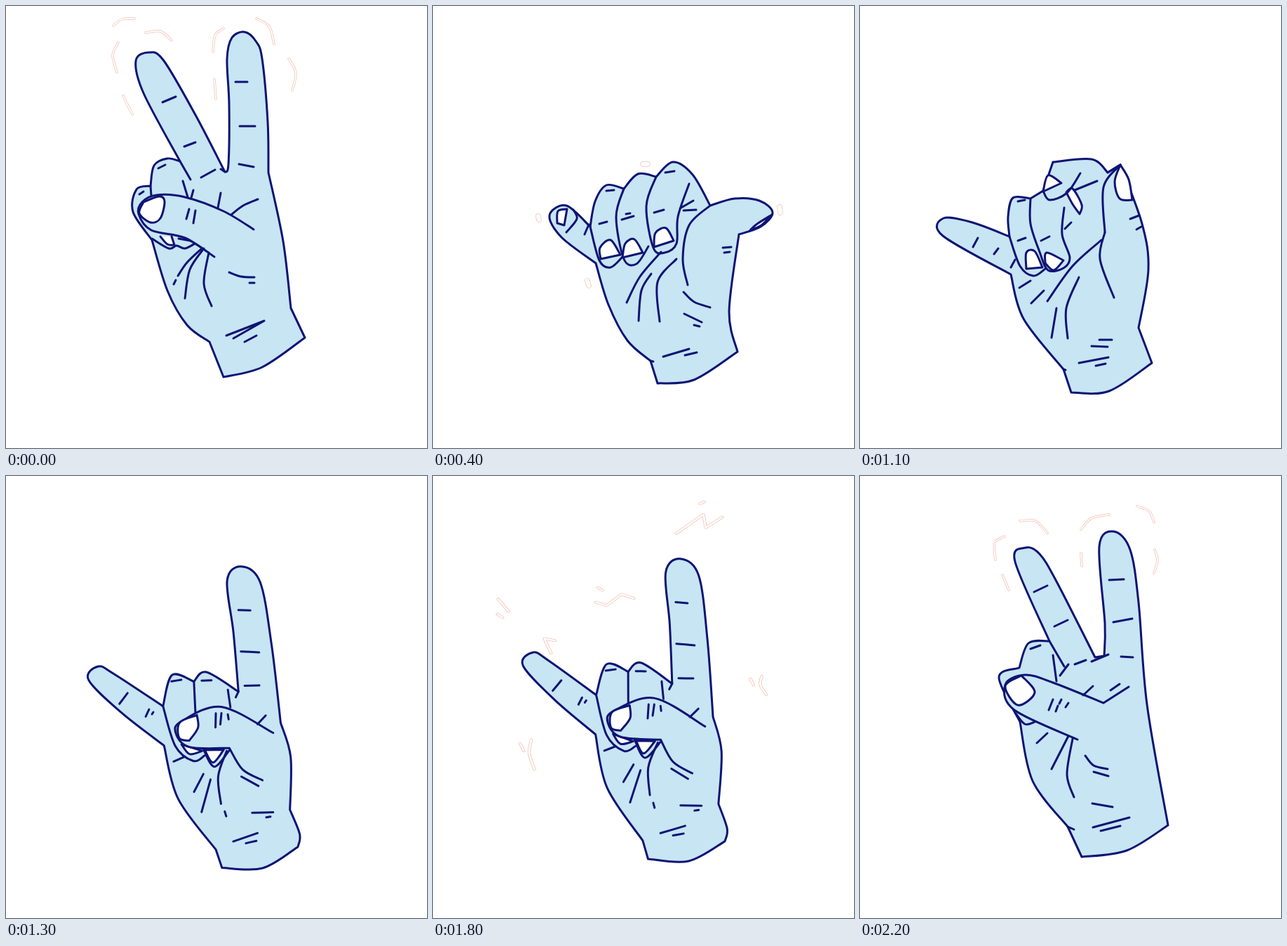
These frames come from a looping animation (600x629 px, 2300 ms). An HTML page with a canvas:

```html
<!DOCTYPE html>
<html lang="en">
<head>
<meta charset="utf-8">
<title>Hand signs</title>
<style>
html, body { margin: 0; width: 100%; height: 100%; overflow: hidden; background: #fff; }
canvas { display: block; }
</style>
</head>
<body>
<canvas id="stage" width="600" height="629"></canvas>
<script>
const ctx = document.getElementById('stage').getContext('2d');
const INK = '#0e1474', SKIN = '#c7e5f3', WHITE = '#fff', GLOW = '#f2bfb1';

// Smooth curve through points; "/" makes the last point a corner, ";" lifts the pen.
function trace(data) {
  const path = new Path2D();
  for (const line of data.split(';')) {
    let last;
    for (const part of line.split('/')) {
      const pts = part.trim().split(' ').map(p => p.split(',').map(Number));
      if (last) pts.unshift(last);
      else path.moveTo(...pts[0]);
      for (let i = 1; i < pts.length; i++) {
        const a = pts[i - 1], b = pts[i], before = pts[i - 2] || a, after = pts[i + 1] || b;
        path.bezierCurveTo(
          a[0] + (b[0] - before[0]) / 6, a[1] + (b[1] - before[1]) / 6,
          b[0] - (after[0] - a[0]) / 6, b[1] - (after[1] - a[1]) / 6, ...b);
      }
      last = pts.at(-1);
    }
  }
  return path;
}

function stroke(path, color, width) {
  ctx.strokeStyle = color;
  ctx.lineWidth = width;
  ctx.stroke(path);
}

function shape(data, fill) {
  const path = trace(data);
  if (fill) {
    ctx.fillStyle = fill;
    ctx.fill(path);
  }
  stroke(path, INK, 3);
}

const skin = data => shape(data, SKIN);
const nail = data => shape(data, WHITE);
const ink = data => shape(data);

// Hollow strokes around the hand.
function glow(data, width) {
  const path = trace(data);
  stroke(path, GLOW, width);
  stroke(path, WHITE, width - 1.5);
}

const peace = {
  marks() {
    glow('153,28 165,19 183,18;199,38 220,36 236,49;160,52 152,70 158,94;167,128 180,154', 3.4);
    glow('295,65 298,42 310,32;357,18 375,29 382,54;403,75 413,95 408,120;297,104 299,132', 3.4);
  },
  hand() {
    skin('310,528 365,514 426,472/406,430/395,335 374,237/373,165 365,75 356,50 340,37 322,45 315,75 318,140 317,225 312,236/270,155 225,78 204,66 185,78 196,124 248,221/230,217 211,227 206,256/186,261 181,293 208,333/230,405 258,454 290,478/310,528');
    nail('220,328 230,339 240,340/236,328;246,331 268,335');
    ink('248,221 263,247;206,256 207,270;208,331 232,345 243,341 255,345 271,337');
    skin('353,318 310,292 255,272 215,269 194,279 189,296 207,319 255,330 297,357');
    nail('196,279 218,271 226,278 220,302 206,308 190,295 196,279');
    ink('223,137 242,129;254,200 270,194;278,244 298,233;327,108 344,108;333,171 355,171;332,225 353,229;312,236 306,232;190,268 196,264;217,231 227,226');
    ink('252,249 259,272;267,262 264,273;306,266 302,287;359,275 338,284 321,297;261,289 257,303;270,291 267,309;318,379 335,385 354,386;347,394 354,394');
    ink('279,345 258,365 245,384;242,390 239,396;282,345 262,375 255,416;289,351 282,395 293,427;314,469 368,448/324,473;340,478 357,469');
  }
};

const fist = {
  marks() {
    glow('299,225 306,225;150,299 151,304;494,286 495,294;220,391 222,398', 7.5);
  },
  hand() {
    skin('320,537 372,532 434,492/422,435 436,325/467,314 484,294 465,277 430,274 395,284/370,240 342,222 318,243/292,239 272,260/247,255 231,278 224,314/190,284 166,298 183,329 232,366/250,425 277,476 310,505/320,537');
    ink('224,314 237,362 253,372 271,356;272,260 261,300 272,360 290,367 307,342;318,243 304,285 314,344 330,351 347,338 349,300 365,253;352,288 371,277;357,291 375,290');
    ink('395,284 365,312 356,360 363,397;200,290 205,303 190,322;310,505 314,506');
    nail('239,360 238,344 253,333 267,354/239,360');
    nail('270,358 274,338 287,332 299,351/270,358');
    nail('315,343 317,323 332,316 343,334/315,343');
    nail('191,289 178,292 177,309/187,312/191,289');
    nail('452,319 462,310 483,297/468,312 452,319');
    ink('247,263 258,262;331,237 344,235;269,304 286,299;275,296 281,295;237,310 248,307;315,294 329,290;222,311 216,325;413,344 425,343;415,351 423,350');
    ink('325,350 295,385 276,422;311,381 297,405 293,448;347,360 320,393 323,449;357,407 372,421 395,429;358,438 383,450;372,454 380,456;328,499 365,488;359,497 376,493');
  }
};

const shaka = {
  marks() {
    glow('287,188 305,184 328,188;189,228 205,219 225,219;200,198 207,195;279,218 291,215;185,255 186,259', 8.5);
    glow('47,281 49,286;64,280 68,296;181,405 190,436;198,408 201,423;544,246 549,264;564,225 571,245 567,265;557,208 558,209;565,281 562,287', 8.5);
  },
  hand() {
    skin('302,546 360,543 419,508/396,445/440,345 470,301/518,279 512,261 465,255 420,275 373,332/335,264 289,230 268,247/245,243 231,262/208,262 200,285 204,322/150,295 102,274 87,291 140,335 202,367/221,415 245,463 285,507/302,546');
    ink('204,322 218,360 235,367 249,359;231,262 226,300 246,344 258,367 280,350;268,247 259,295 276,330 285,351 305,349 314,328 303,298/315,278 312,257;335,287 304,298');
    ink('373,332 318,366 288,417;285,507 298,512');
    nail('221,354 224,339 243,344/240,358 228,361 221,354');
    nail('248,351 256,338 267,341/273,353 262,363 248,351');
    nail('281,346 283,327 302,336/295,349 281,346');
    nail('472,300 485,287 517,278/472,300');
    ink('145,300 137,319;176,323 172,336;279,238 291,237;240,259 255,255;233,317 244,313;271,296 286,291;274,300 287,296;317,335 329,327;221,383 231,377;437,323 447,326;440,316 451,319');
    ink('247,408 270,387/255,407 251,428;280,390 268,412 264,441;370,392 395,407;379,411 390,414;338,469 372,461;294,499 320,495 346,485;333,498 356,486');
  }
};

const pinch = {
  marks() {},
  hand() {
    skin('301,550 355,548 416,508/397,458/411,375 402,310 371,226/353,237/330,218 275,222/261,263/243,274/218,273 211,300 213,328/160,308 119,302 118,327 215,382/233,445 290,517/301,550');
    nail('294,265 303,260 316,283 313,296/303,282 294,265');
    ink('213,328 228,370 247,384 264,374;243,274 243,310 256,350 268,376 290,373 299,358 288,325 291,287;261,263 270,276 295,266 314,238;338,249 306,262');
    skin('371,226 347,258 349,322');
    ink('349,322 342,360 362,415;344,333 303,370 267,420;353,237 371,226;290,517 293,518');
    nail('237,374 237,351 249,349 260,372/237,374');
    nail('264,366 266,351 290,362/276,376 264,366');
    nail('261,264 268,241 287,252/261,264');
    nail('371,226 363,250 370,274 388,276/383,247 371,226');
    ink('225,278 235,276;225,334 236,330;258,334 270,328;292,317 301,308;168,330 161,343;197,345 191,353;221,361 215,372;227,401 243,391;244,423 262,405');
    ink('280,430 273,472;312,386 294,430 296,473;385,303 398,298;394,318 401,314;341,475 359,475;330,484 353,485;312,508 354,500;336,512 350,509');
  }
};

const rock = {
  marks() {
    glow('332,68/368,39/371,59/393,43;363,23 369,20;226,172 240,177/260,160/276,166;229,150 235,154', 4);
    glow('97,167 111,186;96,190 103,195;172,230 158,227/167,249;141,380 138,400 145,425;126,386 131,397;445,284 443,297 451,312;430,288 434,297', 4);
  },
  hand() {
    skin('307,550 365,552 416,523/419,505 406,470/409,395 396,346/386,235 372,145 345,122 325,142 332,215 337,300/292,271 274,284/243,274 229,318/160,270 138,259 124,278 170,326 229,374/247,450 299,524/307,550');
    ink('229,318 245,375 270,397 286,390;274,284 275,332;322,297 325,322;337,300 333,308;285,381 300,406 322,383');
    nail('254,373 265,387 283,383/254,373');
    nail('287,382 298,400 314,382/287,382');
    skin('385,360 312,321 255,340 246,356 265,377 322,380/340,411 368,427');
    nail('277,332 252,342 251,364 265,368/278,350 277,332');
    ink('318,384 305,420 308,459;340,184 357,185;342,243 368,245;346,292 367,292;179,298 167,313;209,322 204,332;215,326 213,329;242,283 256,281;285,283 299,283');
    ink('304,330 303,350;312,330 310,346;321,332 322,339;375,335 363,347;242,397 257,391;284,416 270,441;294,424 280,470;338,421 362,435');
    ink('313,470 315,477;352,473 382,473;372,480 378,479;324,513 359,502;342,516 357,513');
  }
};

const opening = {
  marks() {},
  hand() {
    skin('311,566 368,557 422,518/405,460 385,240 362,178 330,150 310,170 332,240 343,299/334,303/310,245 275,216 225,217 217,232 242,250 274,278/242,277 221,322/190,315 172,336 208,362/226,385/247,463 303,537/311,566');
    ink('262,276 275,288 291,319;274,278 291,319;268,300 260,320 268,335/285,322 309,310;303,537 306,538');
    nail('206,331 188,337 190,351 206,352');
    skin('358,378 300,346 245,325 213,328 207,362 250,392 295,411/317,436 350,447');
    nail('232,324 208,332 210,359 242,364/249,342 232,324');
    ink('332,209 353,207;348,262 371,259;352,300 374,304;333,304 348,297;242,250 270,241;276,277 302,272;245,281 252,279;228,313 239,307;203,328 211,324');
    ink('324,336 320,344;367,346 337,367;374,360 360,367;275,357 272,364 275,372;283,362 281,370;290,361 287,374;269,419 256,432');
    ink('295,411 265,458;297,421 285,467;284,476 283,484;317,448 352,460;335,463 346,467;338,493 378,489;369,497 379,496;331,528 376,515;356,527 371,521');
  }
};

const rising = {
  marks() {
    glow('193,119 192,95 206,86;228,64 250,64 267,81;203,141 212,162', 3.4);
    glow('315,76 330,60 355,55;395,43 412,50 419,66;420,105 424,120 419,138;315,110 316,128', 3.4);
  },
  hand() {
    skin('316,542 380,533 439,497/409,325 397,180 385,105 362,79 341,100 349,210 348,256/335,258/280,150 256,111 236,102 221,122 270,235/240,238 227,273/198,287 228,350/246,434 296,499/316,542');
    ink('270,235 291,271;222,338 235,353 249,350;275,255 280,292;296,499 305,503;297,268 285,284');
    skin('383,300 347,323/275,294 235,283 207,297 220,333 310,375');
    nail('230,284 207,299 225,326 249,308 230,284');
    ink('248,165 267,156;277,214 296,205;355,148 376,147;361,208 388,203;372,257 389,258;306,268 322,262;330,264 354,254;243,246 257,241;318,312 332,299;357,305 370,296');
    ink('275,318 269,333;287,318 284,324;297,323 293,329;282,327 279,335;267,366 252,380;297,370 273,417;303,374 295,425 305,457');
    ink('321,398 333,412 353,417;333,421 354,427;331,466 360,471;332,500 384,486;343,505 371,498');
  }
};

// first: first step shown; key: resting step; from/to: marks shown, counted from key;
// sx, sy: growth of the marks and dy: drift of the hand, per step.
const shots = [
  { pose: peace, first: 0, key: 0, from: 0, to: 1, sx: 0, sy: .01, dy: 4 },
  { pose: fist, first: 3, key: 4, from: 0, to: 0, sx: 0, sy: 0, dy: 1 },
  { pose: shaka, first: 5, key: 7, from: -2, to: 2, sx: .02, sy: .08, dy: 2 },
  { pose: pinch, first: 10, key: 11, from: 9, to: 9, sx: 0, sy: 0, dy: 1 },
  { pose: rock, first: 13, key: 16, from: -2, to: 2, sx: .04, sy: -.03, dy: -2 },
  { pose: opening, first: 19, key: 20, from: 9, to: 9, sx: 0, sy: 0, dy: 4 },
  { pose: rising, first: 21, key: 22, from: 0, to: 0, sx: 0, sy: 0, dy: -10 }
];

function draw(step) {
  const { pose, key, from, to, sx, sy, dy } = shots.findLast(s => s.first <= step);
  const k = step - key;
  ctx.resetTransform();
  ctx.fillStyle = WHITE;
  ctx.fillRect(0, 0, 600, 629);
  ctx.lineCap = ctx.lineJoin = 'round';
  if (k >= from && k <= to) {
    ctx.setTransform(1 + sx * k, 0, 0, 1 + sy * k, -150 * sx * k, -300 * sy * k);
    pose.marks();
  }
  ctx.setTransform(1, 0, 0, 1, 365, 520 + dy * k);
  ctx.rotate(k * Math.PI / 360);
  ctx.translate(-365, -520);
  pose.hand();
}

const start = performance.now();
function tick() {
  draw(Math.floor((performance.now() - start) / 100) % 23);
  requestAnimationFrame(tick);
}
tick();
</script>
</body>
</html>
```
